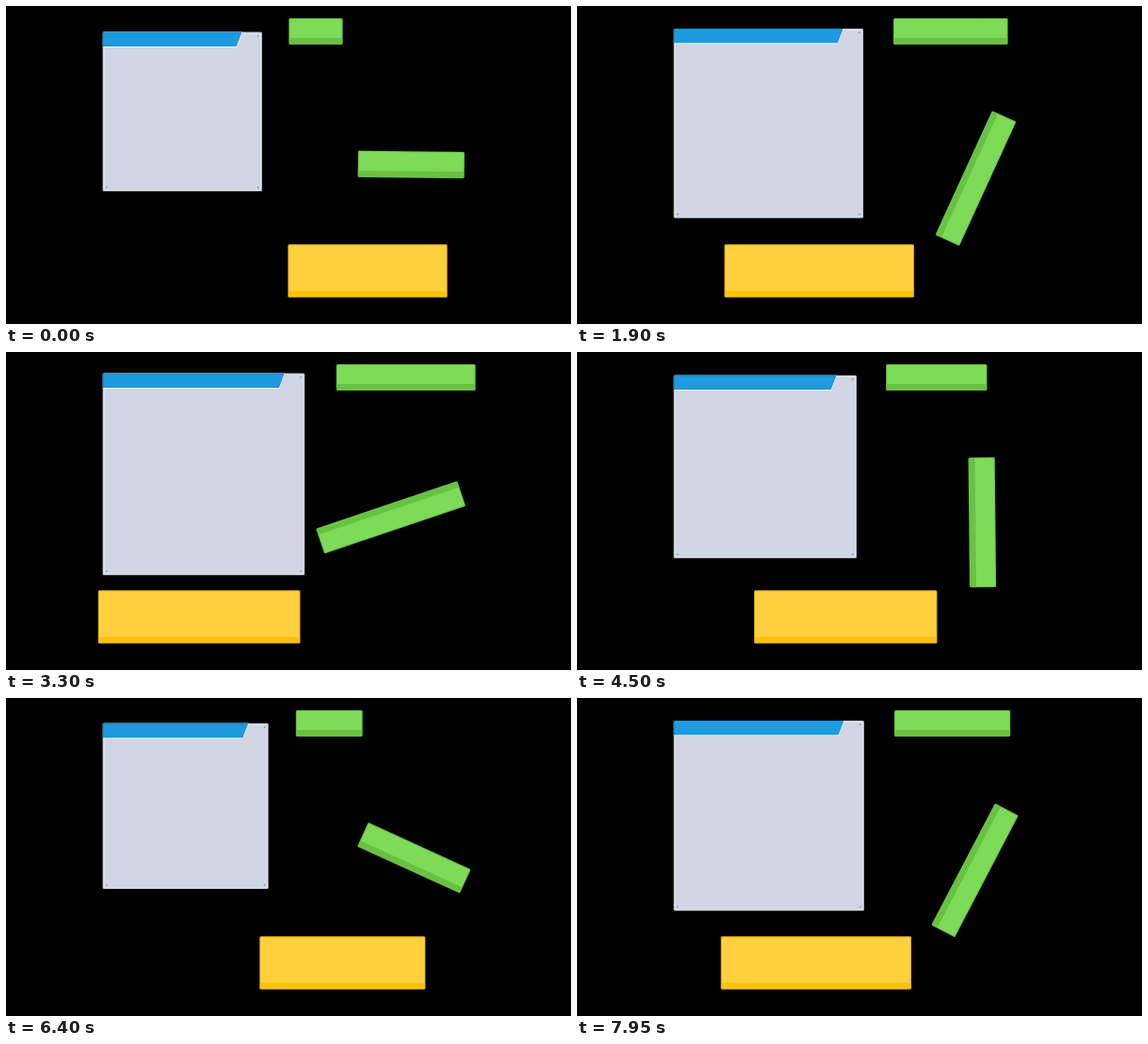
Write an HTML page with a canvas that moves like this. It is 600 px wide and 338 px high and loops after 8000 ms.

```html
<!DOCTYPE html>
<html lang="en">
<head>
<meta charset="utf-8">
<title>Stretching panels</title>
<style>
  html, body { margin: 0; width: 100%; height: 100%; overflow: hidden; background: #000; }
  canvas { display: block; }
</style>
</head>
<body>
<canvas id="stage" width="600" height="338"></canvas>
<script>
const ctx = document.getElementById('stage').getContext('2d');
const LOOP = 8000, STEP = 50, SWEEP = 3000;
const GREEN = { face: '#7edb57', lip: '#69c143', edge: '#66ba42' };
const YELLOW = { face: '#ffd03d', lip: '#fbc10c', edge: '#dfa91a' };

function box(color, x, y, w, h, radius = 0) {
  ctx.fillStyle = color;
  ctx.beginPath();
  ctx.roundRect(x, y, w, h, radius);
  ctx.fill();
}

function shape(color, points) {
  ctx.fillStyle = color;
  ctx.beginPath();
  points.forEach(([x, y]) => ctx.lineTo(x, y));
  ctx.fill();
}

// Border and lip keep their thickness whatever the button's size.
function button({ face, lip, edge }, x, y, w, h) {
  box(edge, x, y, w, h, 1.5);
  box(face, x + 1, y + 1, w - 2, h - 2, 1);
  box(lip, x + 1, y + h - 7, w - 2, 6);
}

function panel(x, y, size) {
  const right = x + size, bottom = y + size;
  box('#abb3bf', x, y, size, size, 1.5);
  box('#e6eaf2', x + 0.8, y + 0.8, size - 1.6, size - 1.6, 1);
  box('#d0d6e3', x + 2, y + 2, size - 3.5, size - 3.5);
  shape('#eff3f9', [[x + 1, y], [right - 21, y], [right - 27, y + 16.3], [x + 1, y + 16.3]]);
  shape('#1b87bd', [[x + 0.3, y], [right - 21.5, y], [right - 27.4, y + 15.3], [x + 0.3, y + 15.3]]);
  shape('#1e9ade', [[x + 1, y + 0.8], [right - 22.3, y + 0.8], [right - 27.8, y + 15], [x + 1, y + 15]]);
  for (const [dx, dy] of [[right - 4.2, y + 4.2], [x + 4.2, bottom - 4.2], [right - 4.2, bottom - 4.2]]) {
    box('#8b919c', dx - 0.9, dy - 0.9, 1.8, 1.8, 0.9);
  }
}

function draw(time) {
  // A linear sweep there and back drives every size, place and angle.
  const phase = (time + 10) / SWEEP % 2;
  const u = phase < 1 ? phase : 2 - phase;
  const growth = 50.7 * u;

  box('#000', 0, 0, 600, 338);
  panel(102.6, 27.6 - 5.6 * u, 169.2 + growth);
  button(GREEN, 300.1 + 56.4 * u, 12.9, 57 + 101.4 * u, 28.2);
  button(YELLOW, 300.1 - 225.6 * u, 253.3, 169.2 + growth, 56.4);

  ctx.save();
  ctx.translate(430.2, 168.5);
  ctx.rotate(Math.PI * u);
  button(GREEN, -56.5, -14.1, 113 + growth, 28.2);
  ctx.restore();
}

const start = performance.now();
function tick() {
  const elapsed = (performance.now() - start) % LOOP;
  draw(Math.floor(elapsed / STEP) * STEP);
  requestAnimationFrame(tick);
}
tick();
</script>
</body>
</html>
```
